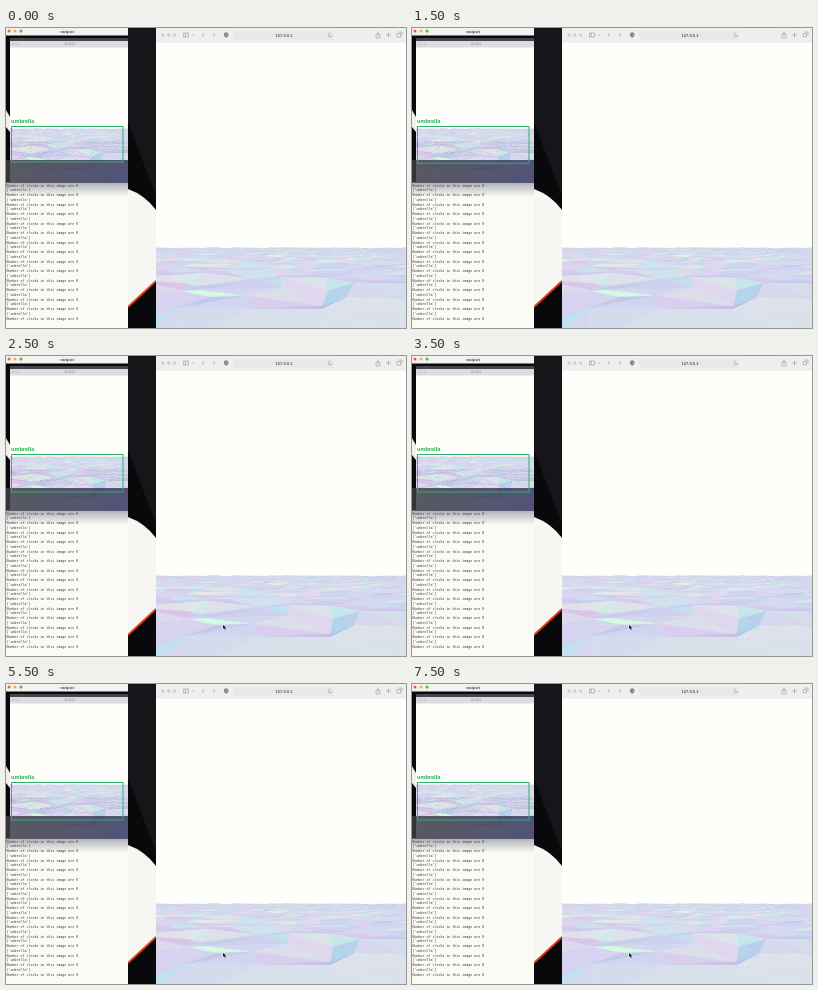
An HTML page with a canvas for the animation above (8 s loop, 400 px wide and 300 px high).

```html
<!DOCTYPE html>
<html lang="en">
<head>
<meta charset="utf-8">
<title>Object detection demo</title>
<style>
html, body { margin: 0; width: 100%; height: 100%; overflow: hidden; background: #fefefb; }
canvas { display: block; width: 400px; height: 300px; }
</style>
</head>
<body>
<canvas id="stage" width="400" height="300"></canvas>
<script>
const ctx = document.getElementById('stage').getContext('2d');
const LOOP = 8000, STEP = 500, SETTLE = 2500;
const MONO = '"DejaVu Sans Mono", monospace', SANS = '"Liberation Sans", sans-serif';
const PAGE = '#fefefb', INK = '#a3a2a8', BLACK = '#09090c';

// The terrain is drawn once per camera position and reused in the small capture
const land = document.createElement('canvas');
land.width = 250;
land.height = 82;
const lc = land.getContext('2d');
const HORIZON = -5, DROP = 87, FOCAL = 92, ROW = 0.33, ROWS = 38, RELIEF = 0.32;
let lastCam = -1;

function hash(i, j, k) {
  const s = Math.sin(i * 127.1 + j * 311.7 + k * 74.7) * 43758.5453;
  return s - Math.floor(s);
}

function vertex(i, j, cam) {
  const wx = j + (i % 2) / 2 + (hash(i, j, 1) - 0.5) * 0.8;
  const wz = 0.55 + i * ROW + (hash(i, j, 2) - 0.5) * 0.28;
  const h = (hash(i, j, 3) - 0.4) * RELIEF;
  return {
    wx, wz, h,
    x: 125 + (wx - cam * 0.12) * FOCAL / wz,
    y: HORIZON + (DROP - h * 50) / wz
  };
}

// Pastel colour from the direction a facet faces
function normalColor(a, b, c) {
  const ux = b.wx - a.wx, uy = b.h - a.h, uz = b.wz - a.wz;
  const vx = c.wx - a.wx, vy = c.h - a.h, vz = c.wz - a.wz;
  let nx = uy * vz - uz * vy, ny = uz * vx - ux * vz, nz = ux * vy - uy * vx;
  const len = Math.hypot(nx, ny, nz) * Math.sign(ny) || 1;
  nx /= len; ny /= len; nz /= len;
  const rgb = [210 + nx * 62 - nz * 14, 212 - nx * 22 - nz * 38, 240 - Math.abs(nz) * 16];
  return `rgb(${rgb.map(v => Math.round(Math.max(150, Math.min(250, v))))})`;
}

function facet(a, b, c) {
  if (Math.max(a.x, b.x, c.x) < 0 || Math.min(a.x, b.x, c.x) > 250) return;
  lc.fillStyle = lc.strokeStyle = normalColor(a, b, c);
  lc.beginPath();
  for (const p of [a, b, c]) lc.lineTo(p.x, p.y);
  lc.closePath();
  lc.fill();
  lc.stroke();
}

function drawLand(cam) {
  if (cam === lastCam) return;
  lastCam = cam;
  lc.clearRect(0, 0, 250, 82);
  lc.lineWidth = 0.4;
  for (let i = ROWS; i >= 0; i--) {
    const half = Math.ceil((1 + i * ROW) * 1.5) + 3;
    for (let j = -half; j < half; j++) {
      const a = vertex(i, j, cam), b = vertex(i, j + 1, cam);
      const c = vertex(i + 1, j, cam), d = vertex(i + 1, j + 1, cam);
      const [p, q] = i % 2 ? [a, d] : [b, c];
      facet(p, q, i % 2 ? c : d);
      facet(p, q, i % 2 ? b : a);
    }
  }
}

function box(color, x, y, w, h) {
  ctx.fillStyle = color;
  ctx.fillRect(x, y, w, h);
}

function shape(path, color) {
  ctx.fillStyle = color;
  ctx.fill(new Path2D(path));
}

function stroke(path, color = INK, width = 0.7) {
  ctx.strokeStyle = color;
  ctx.lineWidth = width;
  ctx.stroke(new Path2D(path));
}

function dots(colors, x, y, gap, r) {
  colors.forEach((color, i) => {
    ctx.fillStyle = color;
    ctx.beginPath();
    ctx.arc(x + i * gap, y, r, 0, 7);
    ctx.fill();
  });
}

function text(str, x, y, size, color, font = SANS, align = 'left', weight = 400) {
  ctx.save();
  ctx.translate(x, y);
  ctx.scale(0.1, 0.1);
  ctx.font = `${weight} ${size * 10}px ${font}`;
  ctx.textAlign = align;
  ctx.fillStyle = color;
  ctx.fillText(str, 0, 0);
  ctx.restore();
}

function fade(x, y, w, h, dx, dy, from, to) {
  const g = ctx.createLinearGradient(x, y, x + w * dx, y + h * dy);
  g.addColorStop(0, from);
  g.addColorStop(1, to);
  box(g, x, y, w, h);
}

function desktop() {
  box('#15151a', 0, 0, 152, 300);
  shape('M122 94L150 168V190H122Z', BLACK);
  shape('M122 161Q139 167 150 182V253L122 279Z', '#f7f6f3');
  shape('M122 279L150 253V300H122Z', BLACK);
  stroke('M122 279L150 253', '#e03a1c', 1.8);
}

function terminal() {
  box('#fbfaf5', 0, 150, 122, 150);
  for (let i = 0; i < 29; i++) {
    const str = i % 2 ? "['umbrella']" : 'Number of clocks in this image are 0';
    text(str, 0.6, 158.5 + i * 4.75, 3.3, '#3a3a3c', MONO);
  }
}

function capture(boxBottom) {
  box(BLACK, 0, 7, 122, 147);
  shape('M0 82L4 89V104L0 99Z', '#f0f0ee');
  box('#45454c', 4, 10, 118, 3);
  box(PAGE, 4, 13, 118, 100);
  box('#dcdbdf', 4, 13, 118, 6.5);
  dots(Array(3).fill('#bab9c0'), 7, 16, 3, 0.8);
  text('127.0.0.1', 64, 17.2, 2.6, '#85848a', SANS, 'center');
  ctx.drawImage(land, 4, 100, 118, 55);
  fade(0, 132, 122, 23, 1, 0, 'rgba(62,62,66,.82)', 'rgba(48,48,92,.8)');
  fade(0, 155, 122, 14, 0, 1, 'rgba(70,70,96,.4)', 'rgba(70,70,96,0)');

  text('umbrella', 5, 95.2, 5.6, '#20b24c', SANS, 'left', 700);
  ctx.strokeStyle = '#31b069';
  ctx.lineWidth = 1;
  ctx.strokeRect(5.5, 98.5, 111.5, boxBottom - 98.5);

  box('#f2f1f0', 0, 0, 122, 7.5);
  dots(['#ed5a4c', '#eab83a', '#51b947'], 3, 3, 6, 1.5);
  text('output', 61, 4.5, 4.4, '#4a494c', SANS, 'center', 700);
}

function browser() {
  box(PAGE, 150, 0, 250, 300);
  box('#f0eff0', 150, 0, 250, 14);
  box('#e0dfe2', 150, 13.7, 250, 0.6);
  dots(Array(3).fill('#cfced3'), 157, 7, 5.8, 1.7);
  stroke('M177.5 5h5v4h-5zM179.3 5v4M186 6.4l1.2 1.2 1.2-1.2');
  stroke('M198 5l-2 2 2 2M207 5l2 2-2 2');
  shape('M218 5l2.2-.8 2.2.8v3l-2.2 2-2.2-2z', '#8d8c93');
  box('#e8e7ea', 227, 2.6, 100, 9);
  text('127.0.0.1', 278, 8.6, 4.1, '#59585d', SANS, 'center', 700);
  stroke('M325.8 7a1.8 1.8 0 1 1-1.8-1.8');
  stroke('M370 6h4v4h-4zM372 8v-4.5M380 7h5M382.5 4.5v5');
  stroke('M391 5.5h3.5v3.5h-3.5zM392.5 4h3.5v3.5');
  ctx.drawImage(land, 150, 219);
}

function cursor(x, y) {
  const arrow = `M${x} ${y}v4l1-.9.9 1.9 1-.5-.9-1.8h1.3z`;
  stroke(arrow, '#fff', 1);
  shape(arrow, '#111114');
}

function draw(t) {
  const left = Math.max(0, 1 - t / SETTLE);
  drawLand(left);
  desktop();
  terminal();
  capture(136 - 2 * left);
  browser();
  if (t >= SETTLE) cursor(217, 269);
}

function tick(now) {
  draw(Math.floor((now % LOOP) / STEP) * STEP);
  requestAnimationFrame(tick);
}
draw(0);
requestAnimationFrame(tick);
</script>
</body>
</html>
```
